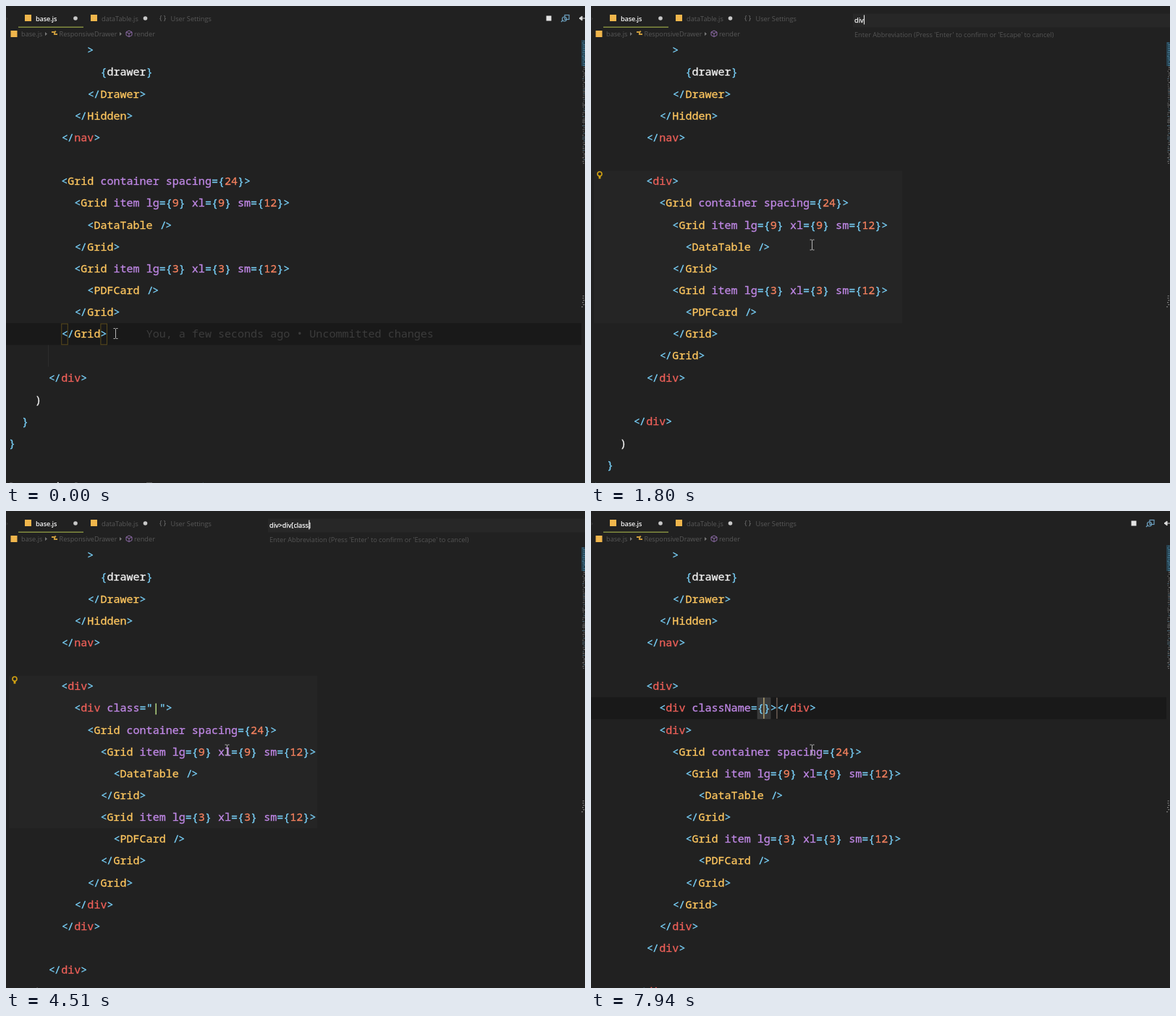
Animation, 800 px wide and 659 px high, one loop 7990 ms. Source, as an HTML page:

```html
<!DOCTYPE html>
<html lang="en">
<head>
<meta charset="utf-8">
<title>Wrap with abbreviation</title>
<style>
html, body { margin: 0; width: 100%; height: 100%; overflow: hidden; background: #212121; }
svg { display: block; width: 800px; height: 659px; }
.code { font: 500 15.05px "Noto Sans Mono", "DejaVu Sans Mono", monospace; }
#code { stroke-width: .3px; }
.ui { font: 9.2px "Open Sans", "Noto Sans", sans-serif; }
</style>
</head>
<body>
<svg viewBox="0 0 800 659">
  <rect width="800" height="659" fill="#212121"/>
  <g id="back"></g>
  <g id="code" class="code"></g>
  <g id="front"></g>
  <g id="chrome" class="ui"></g>
  <g id="palette" class="ui">
    <rect x="362" y="8" width="438" height="42" fill="#212121"/>
    <rect x="362" y="10.5" width="438" height="19" fill="#272727"/>
    <text id="input" x="364" y="22.5" fill="#fff" stroke="#fff" stroke-width=".25"></text>
    <rect id="caret" y="12.5" width="1.2" height="13" fill="#e0e0e0"/>
    <text x="364" y="43.3" fill="#545454">Enter Abbreviation (Press 'Enter' to confirm or 'Escape' to cancel)</text>
  </g>
  <g id="mouse" fill="none" stroke="#b4b4b4">
    <path d="M-3 -7h2.2l.8 .8l.8 -.8h2.2M0 -6.2V6.2M-3 7h2.2l.8 -.8l.8 .8h2.2"/>
  </g>
</svg>
<script>
const LOOP = 7990, CW = 9.03, LH = 30.15;
const SELECT = 60, BULB = 950, OPEN = 1050, ENTER = 7140;
const BLUE = '#79d0f8', WHITE = '#f4f4f4', YELLOW = '#ffc75f', RED = '#ee6059',
      PURPLE = '#c088e6', ORANGE = '#f6825f', GREEN = '#c0e588';
const $ = id => document.getElementById(id);
const colX = c => 4 + c * CW;
const baseY = r => 66.3 + r * LH;
const topY = r => baseY(r) - 20;

const rect = (x, y, w, h, fill, more = '') =>
  `<rect x="${x}" y="${y}" width="${w}" height="${h}" fill="${fill}" ${more}/>`;
const label = (x, y, s, fill, more = '') =>
  `<text x="${x}" y="${y}" fill="${fill}" ${more}>${s.replace(/&/g, '&amp;').replace(/</g, '&lt;')}</text>`;
const pad = (n, s) => ' '.repeat(n) + s;

// document model
const HEAD = [pad(12, '>'), pad(14, '{drawer}'), pad(12, '</Drawer>'), pad(10, '</Hidden>'), pad(8, '</nav>'), ''];
const item = (n, child) => [`  <Grid item lg={${n}} xl={${n}} sm={12}>`, `    <${child} />`, '  </Grid>'];
const GRID = ['<Grid container spacing={24}>', ...item(9, 'DataTable'), ...item(3, 'PDFCard'), '</Grid>'];
const TAIL = ['', pad(6, '</div>'), pad(4, ')'), pad(2, '}'), '}', '', 'ResponsiveDrawer.propTypes = {'];

const wrap = (tag, inner) => [`<${tag}>`, ...inner.map(l => pad(2, l)), `</${tag.split(' ')[0]}>`];

function expand(abbr) {
  const m = abbr.match(/^(\w*)(?:>(\w*))?(?:\[(\w*)\]?)?(?:\+(\w*))?$/);
  if (!m || !m[1]) return GRID;
  const [, outer, child, attr, sibling] = m;
  if (!child) return wrap(outer, GRID);
  const tag = attr ? `${child} ${attr}="|"` : child;
  if (!sibling) return wrap(outer, wrap(tag, GRID));
  return wrap(outer, [`<${tag}>|</${child}>`, ...wrap(sibling, GRID)]);
}

const accepted = value =>
  wrap('div', [`<div className=${value}></div>`, ...wrap('div', GRID)]);

// keystrokes in the input: [time, text, characters right of the caret]
const keys = [[OPEN, '', 0]];
function type(times, chars, after = '') {
  [...chars].forEach((ch, i) => {
    const last = keys[keys.length - 1][1];
    const left = last.slice(0, last.length - after.length);
    keys.push([times[i], left + ch + after, after.length]);
  });
}
type([1400, 1550, 1700], 'div');
type([2290, 2400, 2500, 2600], '>div');
type([2900, 3020], '[]');
keys.push([3200, 'div>div[]', 1]);
type([3480, 3660, 3800, 3950, 4200, 4800, 4950, 5100, 5250], 'className', ']');
keys.push([5700, 'div>div[className]', 0]);
type([5980, 6150, 6280, 6400], '+div');

const keyAt = t => keys.filter(k => k[0] <= t).pop();

function blockAt(t) {
  if (t < OPEN) return GRID;
  if (t < ENTER) return expand(keyAt(t)[1]);
  return accepted(t < 7500 ? '""' : t < 7830 ? '' : '{}');
}

function paintLine(line, row) {
  let out = '', prev = '', inTag = false, quoted = false;
  const put = (c, s, fill, dx = 0) => {
    out += label(colX(c) + dx, baseY(row), s, fill, `stroke="${fill}"`);
  };
  for (const m of line.matchAll(/<\/|\/>|[<>{}="|]|\w+|\S/g)) {
    const s = m[0], c = m.index;
    // the two halves of a closing mark sit closer together
    if (s === '</') { put(c, '<', BLUE, .5); put(c + 1, '/', BLUE, -.5); inTag = true; }
    else if (s === '/>') { put(c, '/', BLUE, 1); put(c + 1, '>', BLUE, -.5); inTag = false; }
    else if ('<>{}="'.includes(s)) {
      put(c, s, BLUE);
      if (s === '<') inTag = true;
      if (s === '>') inTag = false;
      if (s === '"') quoted = !quoted;
    }
    else if (s === '|') put(c, s, quoted ? GREEN : '#c9d6e0');
    else if (prev === '<' || prev === '</') put(c, s, /^[A-Z]/.test(s) ? YELLOW : RED);
    else put(c, s, !inTag ? WHITE : /^\d/.test(s) ? ORANGE : PURPLE);
    prev = s;
  }
  return out;
}

const ease = p => p * p * (3 - 2 * p);
const span = (t, a, b) => ease(Math.min(1, Math.max(0, (t - a) / (b - a))));
function mouseAt(t) {
  const p = span(t, 40, 560), q = span(t, 600, 920);
  const x = 151.5 - 73.5 * p, y = 452.5 - 210.5 * p;
  return [x + (305.5 - x) * q, y + (330 - y) * q];
}

// text cursor while dragging from the end of the block to its start
function dragAt(t, lines) {
  const [x, y] = mouseAt(Math.min(t, 580));
  const row = Math.max(6, Math.min(13, Math.floor((y - topY(0)) / LH)));
  return [row, Math.min(lines[row].length, Math.max(0, Math.round((x - 4) / CW)))];
}

function selection(row, col, lines) {
  let out = '';
  for (let r = row; r <= 13; r++) {
    const indent = lines[r].search(/\S/);
    const from = r === row ? col : 0;
    const end = r === 13 ? 15 : lines[r].length + .5;
    const x = colX(Math.max(from, indent));
    if (from < indent) out += rect(4, topY(r), 54, LH, '#2a2a2a');
    if (colX(end) > x) out += rect(x, topY(r), colX(end) - x, LH, '#333333', 'rx="2"');
  }
  return out;
}

const cursor = (row, col, fill) => rect(colX(col) - .6, topY(row) + .5, 1.3, LH - 1, fill);
const rowBand = row => rect(0, topY(row), 795, LH, '#191919');
const blame = (row, col, fill) =>
  label(colX(col), baseY(row), 'You, a few seconds ago • Uncommitted changes', fill, 'class="code"');
const bracket = (row, col, fill, line) =>
  rect(colX(col) + .5, topY(row) + .8, CW - .5, LH - 1.4, fill, `stroke="${line}"`);

function decorate(t, lines) {
  let back = '', front = '';
  if (t < SELECT) {
    back = rowBand(13) + blame(13, 21, '#3c3c3c') +
      bracket(13, 8, 'none', '#5a4a1c') + bracket(13, 14, 'none', '#5a4a1c') +
      rect(58, topY(14), 1, LH, '#2c2c2c');
  } else if (t < keys[1][0]) {
    const [r, c] = dragAt(t, lines);
    back = selection(r, c, lines);
    if (t >= BULB) back += blame(6, 43, '#454545');
    if (t < OPEN) front = cursor(r, c, '#d8ab20');
  } else if (t < ENTER) {
    back = rect(4, topY(6), 426, LH * 7, '#252525');
  } else {
    back = rowBand(7);
    const at = t < 7500 || t >= 7830 ? 26 : 25;
    if (t >= 7830) back += bracket(7, 25, '#393939', '#414141') + bracket(7, 26, '#393939', '#414141');
    front = cursor(7, at, '#c4b07a') + cursor(7, at + 2, '#77665c');
  }
  if (t >= BULB && t < ENTER)
    front += '<circle cx="12" cy="232" r="3" fill="none" stroke="#d3a212" stroke-width="1.6"/>' +
      rect(10.6, 235, 2.8, 3.6, '#d3a212');
  return [back, front];
}

function drawChrome() {
  const dim = '#585858';
  const tile = (x, y) => rect(x, y, 9, 9, '#f0b64c');
  const dot = x => `<circle cx="${x}" cy="17" r="2.8" fill="#c9c9c9"/>`;
  const chevron = x => `<path d="M${x} 36l3 2.6l-3 2.6z" fill="#777"/>`;
  let s = tile(26, 12) + label(41, 20.5, 'base.js', WHITE, 'font-weight="600" letter-spacing="-.15"') + dot(96) +
    rect(17, 28.6, 90, 1.2, '#9ba748') +
    tile(117, 12) + label(132, 20.5, 'dataTable.js', dim) + dot(192.5) +
    label(212, 20, '{ }', '#777') + label(227.5, 20.5, 'User Settings', dim) +
    label(0, 20, '›', '#444') +
    tile(6.5, 34) + label(21, 41.5, 'base.js', dim) + chevron(54) +
    '<path d="M63 36h4v3h4M67 36l2 -1" fill="none" stroke="#c99a3c" stroke-width="2"/>' +
    label(73.5, 41.5, 'ResponsiveDrawer', dim) + chevron(157) +
    '<path d="M170 34l4 2v4.500l-4 2l-4 -2v-4.500zM166 36l4 2l4 -2M170 38v4.500" fill="none" stroke="#8d6ba8"/>' +
    label(177, 41.5, 'render', dim) +
    rect(746.5, 13.5, 7, 7, '#e4e4e4') +
    '<g fill="none" stroke="#6c9fbe" stroke-width="1.2"><rect x="772" y="12.500" width="6" height="6"/>' +
    '<circle cx="771.500" cy="18" r="3"/><path d="M769 20l-2 2"/></g>' +
    '<path d="M792 17l4 -3v6zM796 17h4" fill="#ddd" stroke="#ddd"/>' +
    rect(795, 47, 5, 36, '#26414f');
  // minimap specks
  let seed = 7;
  const rnd = () => (seed = seed * 16807 % 2147483647) / 2147483647;
  for (let y = 48; y < 218; y += 2.6) {
    const w = 1 + rnd() * 3;
    s += rect(796 + rnd() * 2, y, w, 1, y < 83 ? '#4a87a5' : ['#666', '#808080', '#55707f'][Math.floor(rnd() * 3)]);
  }
  for (let y = 400; y < 417; y += 3) s += rect(795 + rnd() * 3, y, 2, 1.2, '#808080');
  $('chrome').innerHTML = s;
}

let shown = '';
function draw(t) {
  const lines = [...HEAD, ...blockAt(t).map(l => pad(8, l)), ...TAIL].slice(0, 21);
  const text = lines.join('\n');
  if (text !== shown) {
    $('code').innerHTML = lines.map(paintLine).join('');
    shown = text;
  }
  [$('back').innerHTML, $('front').innerHTML] = decorate(t, lines);

  const open = t >= OPEN && t < ENTER;
  $('palette').style.display = open ? '' : 'none';
  if (open) {
    const [time, value, right] = keyAt(t), n = value.length - right;
    const input = $('input'), caret = $('caret');
    input.textContent = value;
    caret.setAttribute('x', 364.3 + (n ? input.getSubStringLength(0, n) : 0));
    caret.style.display = (t - time) % 1000 < 500 ? '' : 'none';
  }
  $('mouse').setAttribute('transform', `translate(${mouseAt(t)})`);
}

drawChrome();
const start = performance.now();
function tick() {
  draw((performance.now() - start) % LOOP);
  requestAnimationFrame(tick);
}
tick();
</script>
</body>
</html>
```
